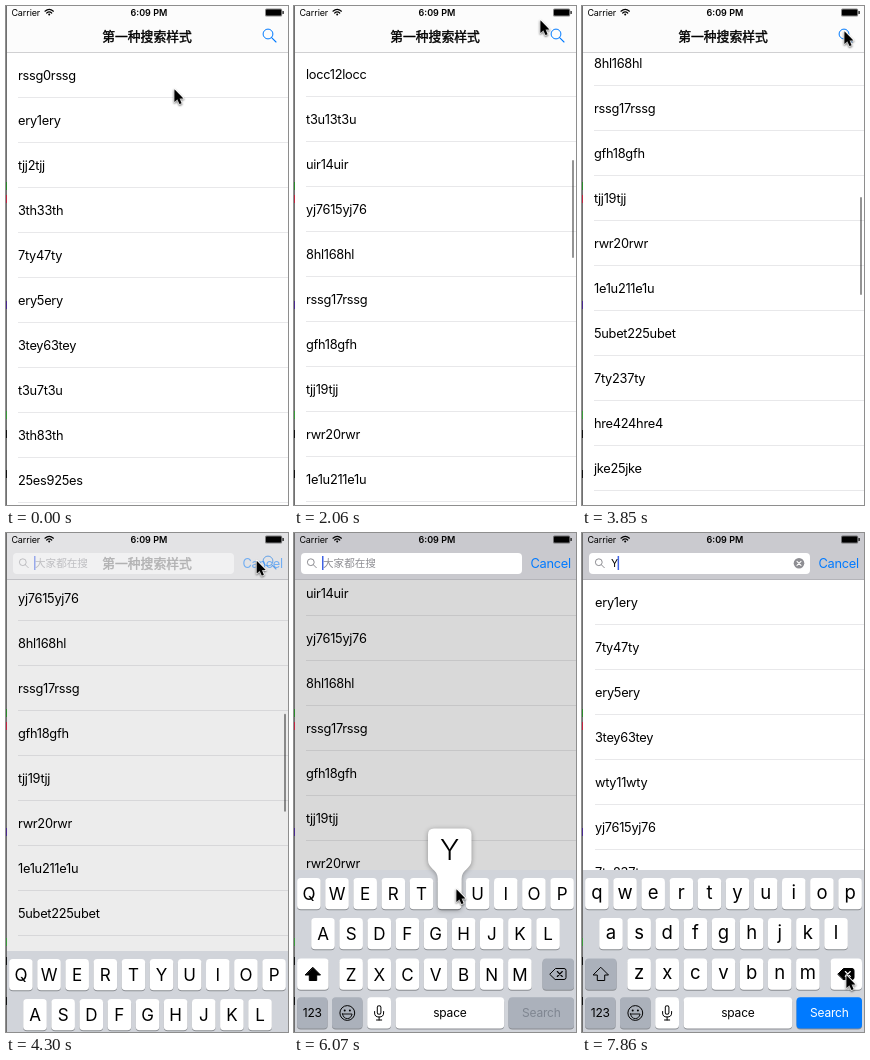
Write an HTML page with a canvas that moves like this. It is 282 px wide and 499 px high and loops after 8000 ms.

```html
<!DOCTYPE html>
<html lang="zh">
<head>
<meta charset="utf-8">
<style>
  html, body { margin: 0; width: 100%; height: 100%; overflow: hidden; background: #fff; }
  canvas { display: block; width: 282px; height: 499px; }
</style>
</head>
<body>
<canvas id="stage"></canvas>
<script>
const W = 282, H = 499, LOOP = 8000, TICK = 148.2;
const canvas = document.getElementById('stage');
const ctx = canvas.getContext('2d');
const ratio = window.devicePixelRatio || 1;
canvas.width = W * ratio;
canvas.height = H * ratio;

const SANS = 'Inter, "Noto Sans CJK SC", "Noto Sans CJK", sans-serif';
const CJK = '"Noto Sans CJK SC", "Noto Sans CJK", sans-serif';
const BLUE = '#007aff', GRAY = '#8e8e93';

const items = ('rssg ery tjj 3th 7ty ery 3tey t3u 3th 25es gfh wty locc t3u uir yj76 8hl rssg ' +
  'gfh tjj rwr 1e1u 5ubet 7ty hre4 jke lo 7tb rwr fjeb wty 0fss yj76 hre4 rssg tjj')
  .split(' ').map((word, i) => word + i + word);

const clamp = v => Math.max(0, Math.min(1, v));
const smooth = v => v * v * (3 - 2 * v);
const progress = (k, from, to) => clamp((k - from) / (to - from));

// Pointer stops: tick, x, y
const pointerStops = [
  [0, 168, 82], [3, 215, 290], [6, 228, 40], [11, 235, 206], [14, 246, 13], [18, 262, 40],
  [21, 273, 66], [22, 275, 205], [26, 262, 24], [28, 262, 24], [32, 187, 40], [39, 160, 364],
  [41, 162, 355], [46, 160, 357], [48, 160, 357], [52, 264, 441]
];

function pointerAt(k) {
  const next = pointerStops.findIndex(p => p[0] > k);
  if (next < 0) return pointerStops.at(-1).slice(1);
  const [k0, x0, y0] = pointerStops[next - 1], [k1, x1, y1] = pointerStops[next];
  const u = smooth(progress(k, k0, k1));
  return [x0 + (x1 - x0) * u, y0 + (y1 - y0) * u];
}

// Two upward flicks, then one back down, each coasting to rest
function scrollAt(k) {
  const coast = (ticks, rate) => 1 - Math.exp(-ticks / rate);
  if (k < 3) return 0;
  if (k < 6) return 260 * progress(k, 3, 6) ** 1.5;
  if (k < 11) return 260 + 88 * coast(k - 6, 1.3);
  if (k < 14) return 348 + 193 * progress(k, 11, 14) ** 1.7;
  if (k < 22) return 541 + 600.5 * coast(k - 14, 3.375);
  return 638 + 94 * Math.exp(-(k - 26) / 3.6);
}

function text(str, x, y, { size = 12.8, color = '#000', weight = 400, align = 'left', family = SANS, spacing = -0.28, outline = 0 } = {}) {
  ctx.font = `${weight} ${size}px ${family}`;
  ctx.letterSpacing = spacing + 'px';
  ctx.textAlign = align;
  ctx.fillStyle = ctx.strokeStyle = color;
  ctx.fillText(str, x, y + size * 0.36);
  if (outline) {
    ctx.lineWidth = outline;
    ctx.strokeText(str, x, y + size * 0.36);
  }
}

function rect(x, y, w, h, color, radius = 0) {
  ctx.fillStyle = color;
  ctx.beginPath();
  ctx.roundRect(x, y, w, h, radius);
  ctx.fill();
}

function shape(d, { fill, stroke, width = 1, x = 0, y = 0, scale = 1 } = {}) {
  const path = new Path2D(d);
  ctx.save();
  ctx.translate(x, y);
  ctx.scale(scale, scale);
  ctx.lineJoin = ctx.lineCap = 'round';
  if (stroke) { ctx.strokeStyle = stroke; ctx.lineWidth = width; ctx.stroke(path); }
  if (fill) { ctx.fillStyle = fill; ctx.fill(path); }
  ctx.restore();
}

function circle(x, y, r, { fill, stroke, width = 1 }) {
  ctx.beginPath();
  ctx.arc(x, y, r, 0, Math.PI * 2);
  if (fill) { ctx.fillStyle = fill; ctx.fill(); }
  if (stroke) { ctx.strokeStyle = stroke; ctx.lineWidth = width; ctx.stroke(); }
}

function withAlpha(alpha, draw) {
  ctx.save();
  ctx.globalAlpha *= alpha;
  draw();
  ctx.restore();
}

function drawRows(rows, scroll, left) {
  for (let i = Math.floor(scroll / 45); i * 45 - scroll < H; i++) {
    const y = 69 + i * 45 - scroll;
    if (rows[i]) text(rows[i], left, y);
    rect(left, y + 22, W - left, 1, '#e8e8ea');
  }
}

function drawStatusBar() {
  text('Carrier', 5.4, 6.5, { size: 9, spacing: -0.1 });
  text('6:09 PM', 142.9, 6.5, { size: 9, weight: 600, align: 'center', spacing: 0 });
  shape('M39 5.2Q43.2 1.4 47.4 5.2M40.7 7Q43.2 4.8 45.7 7', { stroke: '#000', width: 1.2 });
  circle(43.2, 8.6, 1, { fill: '#000' });
  rect(259, 2.6, 17.2, 7.8, 'rgba(0,0,0,.45)', 1.5);
  rect(260, 3.5, 15.2, 6, '#000', 0.8);
  rect(276.5, 5, 1.2, 3, '#000', 0.6);
}

function drawTitleBar() {
  rect(0, 0, W, 46, 'rgba(252,252,252,.97)');
  rect(0, 46, W, 1, '#d0d0d2');
  text('第一种搜索样式', 141, 30, { align: 'center', family: CJK, spacing: 0, outline: 0.4 });
  circle(262, 28, 4.9, { stroke: BLUE });
  shape('M265.6 31.6L270 36', { stroke: BLUE, width: 1.1 });
}

function drawSearchBar(query) {
  rect(0, 0, W, 46, 'rgba(201,201,206,.97)');
  rect(0, 46, W, 1, '#b4b4b9');
  rect(7, 20, 221, 21, '#fff', 4);
  circle(16.8, 29.2, 3.4, { stroke: GRAY });
  shape('M19.4 31.8L22.3 34.7', { stroke: GRAY });
  let caret = 28;
  if (query) {
    text(query, 29, 30, { size: 10.6, spacing: -0.1 });
    caret = 28.5 + ctx.measureText(query).width;
    circle(217, 30.3, 5.3, { fill: GRAY });
    shape('M215 28.3L219 32.3M219 28.3L215 32.3', { stroke: '#fff', width: 1.1 });
  } else {
    text('大家都在搜', 29, 30, { size: 10.6, color: GRAY, family: CJK, spacing: 0 });
  }
  rect(caret, 23, 1.5, 14, '#3f62e4');
  text('Cancel', 236.5, 30, { color: BLUE });
}

function drawKey(x, y, w, color = '#fff') {
  rect(x, y + 1, w, 31.2, '#898c91', 3.8);
  rect(x, y, w, 31.2, color, 3.8);
}

function drawKeyboard({ upper, hasQuery, popup, deleting }) {
  const dark = '#abb1bb';
  rect(0, 337, W, 162, '#d1d4da');
  [['QWERTYUIOP', 3.1, 345], ['ASDFGHJKL', 17.2, 385], ['ZXCVBNM', 45.3, 425.6]].forEach(([letters, left, y]) => {
    [...letters].forEach((letter, i) => {
      const x = left + i * 28.13;
      drawKey(x, y, 23.6);
      const label = upper ? letter : letter.toLowerCase();
      text(label, x + 11.8, y + (upper ? 16 : 14), { size: upper ? 17 : 18.5, align: 'center', spacing: 0 });
    });
  });

  drawKey(3.1, 425.6, 31.5, upper ? '#fff' : dark);
  shape('M0 -7L7.5 .5H3.7V6H-3.7V.5H-7.5Z', { x: 19, y: 441.5, stroke: '#000', fill: upper ? '#000' : null });
  drawKey(248.5, 425.6, 31.5, deleting ? '#fff' : dark);
  shape('M-8 0L-2.5 -5.5H6Q8 -5.5 8 -3.5V3.5Q8 5.5 6 5.5H-2.5Z', { x: 264, y: 441, stroke: '#000', fill: deleting ? '#000' : null });
  shape('M-.7 -2.5L4.3 2.5M4.3 -2.5L-.7 2.5', { x: 264, y: 441, stroke: deleting ? '#fff' : '#000', width: 1.1 });

  const label = { size: 12, align: 'center', spacing: -0.2 };
  drawKey(3.1, 464.3, 30.5, dark);
  text('123', 18.3, 480, label);
  drawKey(38, 464.3, 30.5, dark);
  circle(53.3, 480, 7.4, { stroke: '#000' });
  circle(50.7, 477.6, 1, { fill: '#000' });
  circle(55.9, 477.6, 1, { fill: '#000' });
  shape('M48.5 481H58.1Q57 485.6 53.3 485.6T48.5 481Z', { stroke: '#000', width: 0.9 });
  drawKey(73.2, 464.3, 23.8);
  rect(82.8, 472.3, 4.6, 9.4, '#000', 2.3);
  rect(83.8, 473.3, 2.6, 7.4, '#fff', 1.3);
  shape('M80.6 478.5V480Q80.6 484 85.1 484T89.6 480V478.5M85.1 484V487M82.5 487H87.7', { stroke: '#000' });
  drawKey(101.6, 464.3, 108.6);
  text('space', 155.9, 480, label);
  drawKey(214.5, 464.3, 65.5, hasQuery ? BLUE : dark);
  text('Search', 247.3, 480, { ...label, color: hasQuery ? '#fff' : '#7f8691' });

  if (popup) {
    ctx.save();
    ctx.shadowColor = 'rgba(0,0,0,.35)';
    ctx.shadowBlur = 5 * ratio;
    ctx.shadowOffsetY = ratio;
    shape('M140 295.5H171.5Q177.5 295.5 177.5 301.5V327C177.5 336 167.6 336 167.6 346V372Q167.6 376 163.6 376H147.8' +
      'Q143.8 376 143.8 372V346C143.8 336 134 336 134 327V301.5Q134 295.5 140 295.5Z', { fill: '#fff' });
    ctx.restore();
    text(popup, 155.7, 317, { size: 29, weight: 300, align: 'center', spacing: 0 });
  }
}

function drawWindowEdge() {
  rect(0, 0, 1, H, '#707070');
  [[176, '#2a8a2a'], [189, '#c22440'], [295, '#4a2a90'], [405, '#3a9a3a'], [424, '#111'], [464, '#111']]
    .forEach(([y, color]) => rect(0, y, 1, 8, color));
}

function drawPointer([x, y]) {
  ctx.save();
  ctx.shadowColor = 'rgba(0,0,0,.4)';
  ctx.shadowBlur = 2 * ratio;
  ctx.shadowOffsetY = ratio;
  shape('M1 1V14.5L4.1 11.6L6.4 16.8L8.6 15.8L6.4 10.8H10.6Z',
    { x: x - 0.5, y: y + 0.3, scale: 0.94, stroke: '#fff', width: 2, fill: '#000' });
  ctx.restore();
}

function draw(k) {
  const scroll = Math.round(scrollAt(k));
  const opened = smooth(progress(k, 27, 31));
  const query = k < 42 ? '' : k < 45 || k >= 53 ? 'Y' : 'Yy';
  const popup = k === 41 ? 'Y' : k === 44 ? 'y' : '';

  ctx.setTransform(ratio, 0, 0, ratio, 0, 0);
  rect(0, 0, W, H, '#fff');
  if (query) {
    drawRows(items.filter(item => item.includes(query.toLowerCase())), 0, 13);
  } else {
    drawRows(items, scroll, 12);
    rect(0, 0, W, H, `rgba(0,0,0,${0.15 * opened})`);
    if (k >= 3) withAlpha(1 - progress(k, 34, 37), () =>
      rect(278, 49 + scroll * 0.194, 2, 98, 'rgba(0,0,0,.42)', 1));
  }

  if (opened < 1) drawTitleBar();
  if (opened > 0) withAlpha(opened, () => drawSearchBar(query));
  drawStatusBar();
  if (opened > 0) {
    ctx.save();
    ctx.translate(0, 162 * (1 - opened));
    drawKeyboard({ upper: !query, hasQuery: !!query, popup, deleting: k >= 52 });
    ctx.restore();
  }
  drawWindowEdge();
  drawPointer(pointerAt(k));
}

const start = performance.now();
function frame() {
  const time = (performance.now() - start) % LOOP;
  draw(Math.min(53, Math.floor((time + 16) / TICK)));
  requestAnimationFrame(frame);
}
frame();
</script>
</body>
</html>
```
